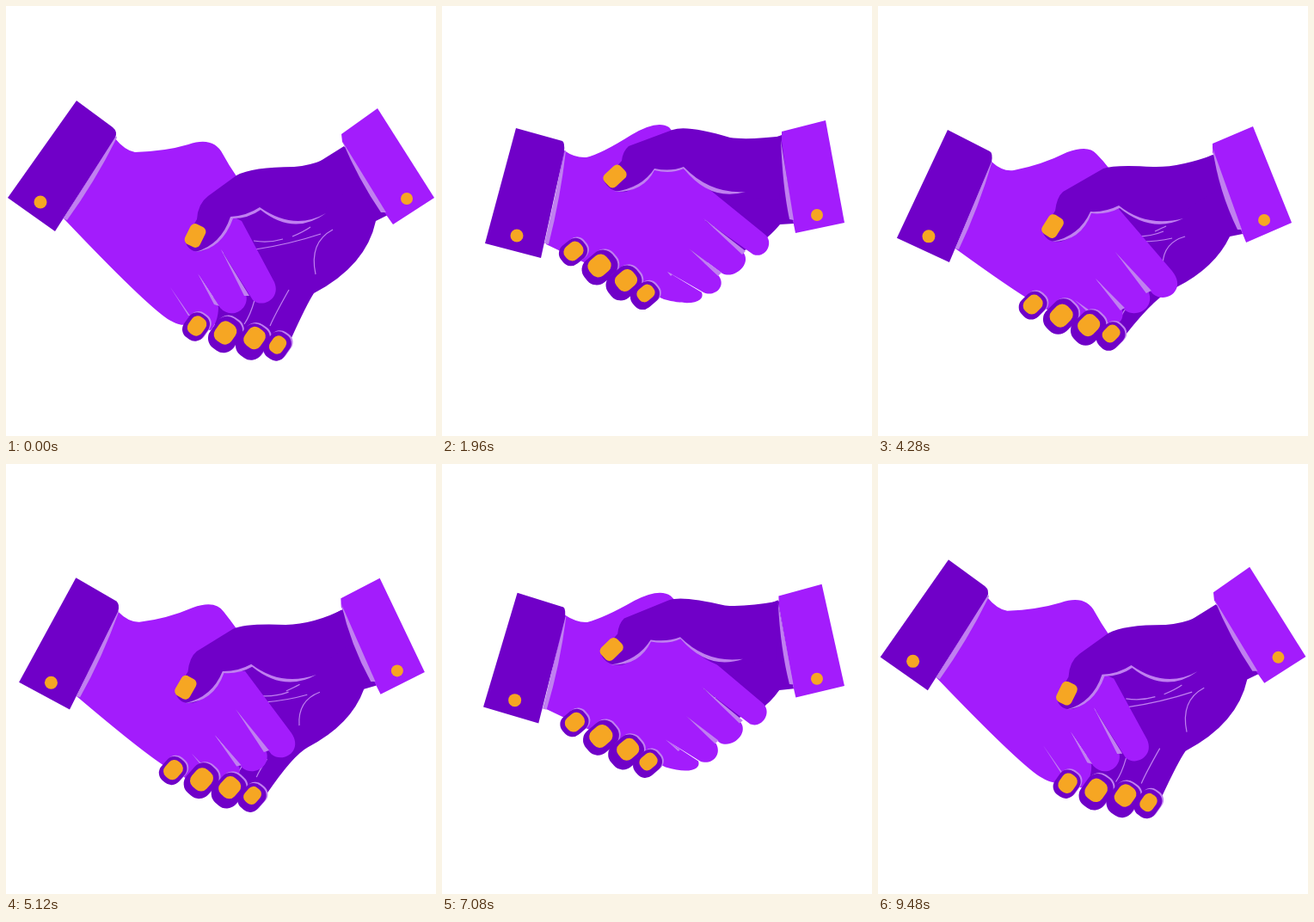
These frames come from a looping animation (500x500 px, 9.6 s). An HTML page with a canvas:

```html
<!DOCTYPE html>
<html lang="en">
<head>
<meta charset="utf-8">
<title>Handshake</title>
<style>
html, body { margin: 0; width: 100%; height: 100%; overflow: hidden; background: #fff; }
canvas { display: block; }
</style>
</head>
<body>
<canvas id="stage" width="500" height="500"></canvas>
<script>
const ctx = document.getElementById('stage').getContext('2d');
const DARK = '#7000c8', LIGHT = '#a31cfc', ORANGE = '#f6a623', SHADE = '#c080f0';
const CYCLE = 4800;

// Every part is given in four poses: reach, clasp, low shake, high shake.
const palm = [
  'M393,163 L444,243 L430,250 Q419,302 358,334 Q350,346 331,388 L300,400 L244,384 L240,345 L262,245Z',
  'M389,173 L424,265 L409,268 Q392,304 347,327 Q325,335 288,382 L268,390 L262,375 L285,350 L265,230Z',
  'M384,171 L409,274 L391,277 Q380,296 364,305 Q345,300 300,340 L280,340 L275,330 L270,320 L260,230Z',
  'M395,150 L409,253 L393,254 Q383,266 372,274 Q345,290 300,300 L290,300 L285,295 L280,290 L265,200Z'];

const creases = [
  'M288,273 Q305,276 322,271 M290,283 Q330,277 366,265 M333,268 Q347,262 354,257 M380,260 Q352,275 360,312 M329,330 Q312,360 307,372 M289,342 Q284,360 277,370',
  'M300,268 Q318,268 332,262 M305,274 Q325,274 342,270 M322,262 Q330,258 335,256 M357,268 Q332,275 331,300 M290,350 Q285,355 283,360 M272,345 Q268,350 264,356',
  'M300,265 Q322,260 330,254 M310,278 Q330,276 341,269 M300,250 Q305,250 310,255 M330,290 Q320,285 318,295 M270,340 Q268,345 266,350 M255,340 Q252,342 250,346',
  'M290,240 Q300,238 310,236 M300,250 Q310,250 320,245 M290,230 Q295,230 300,235 M320,250 Q315,255 316,265 M260,315 Q258,318 256,322 M240,318 Q238,320 236,322'];

const lightHand = [
  'M126,153 Q138,168 150,170 Q185,169 212,161 Q241,151 252,172 Q259,185 268,198 L262,244 L274,250 L312,321 C320,340 299,352 287,342 L250,283 L279,335 C284,352 263,366 249,351 L223,311 L247,350 C247,362 243,372 238,377 L220,374 L212,366 C210,374 200,371 188,364 Q160,345 67,247Z',
  'M132,181 Q145,193 158,191 Q190,185 220,170 Q245,161 254,172 Q262,180 268,188 L247,240 L280,236 L342,308 C360,330 335,347 320,335 L276,286 L315,333 C322,352 300,363 288,354 L253,317 L284,353 C288,372 272,372 262,366 L258,364 L255,366 C250,372 220,370 195,352 Q170,340 90,282Z',
  'M139,191 Q153,200 165,200 Q190,193 225,176 Q252,166 264,176 Q268,178 270,182 L245,225 L277,223 L363,300 C377,312 362,332 348,327 L294,281 L336,323 C348,335 330,355 314,348 L275,314 L309,346 C314,363 300,373 289,368 L252,342 L287,368 C290,377 275,381 258,374 Q200,340 109,297Z',
  'M142,168 Q155,177 168,176 Q185,172 220,150 Q250,132 264,141 Q268,145 270,150 L247,190 L281,189 L376,266 C386,275 377,294 362,289 L304,248 L350,286 C361,300 340,318 326,311 L287,282 L322,314 C331,327 316,339 304,333 L262,309 L302,333 C306,343 292,350 258,341 Q200,315 121,277Z'];

const gaps = [
  'M250,283 L283,337 L277,337Z M223,311 L248,349 L242,347Z M191,327 L214,360 L212,360Z',
  'M276,286 L318,331 L312,334Z M253,317 L287,351 L282,354Z M229,342 L245,353 L243,355Z',
  'M294,281 L340,322 L336,324Z M275,314 L311,343 L307,346Z M252,342 L285,367 L283,368Z',
  'M304,247 L353,285 L349,289Z M287,282 L325,310 L321,314Z M262,309 L268,312 L266,314Z'];

const thumb = [
  'M398,160 Q372,184 335,187 Q286,187 268,197 L235,221 Q223,230 222,248 L208,272 Q212,288 228,285 Q251,276 262,246 Q280,247 295,236 Q320,254 350,254 L415,200Z',
  'M393,172 Q350,188 320,187 Q275,184 262,189 L215,216 Q208,222 206,238 L191,262 Q196,276 212,274 Q236,268 247,240 Q265,242 280,234 Q305,255 330,256 L400,210Z',
  'M388,170 Q350,181 325,180 Q275,173 263,178 L209,203 Q203,210 202,222 L184,245 Q190,262 210,258 Q230,250 241,227 Q262,228 276,222 Q300,245 322,253 L390,230Z',
  'M399,151 Q355,156 335,153 Q285,138 268,144 L217,163 Q210,169 209,180 L188,203 Q196,218 214,216 Q236,208 247,190 Q266,195 281,188 Q305,215 330,222 L392,225Z'];

const thumbShade = [
  'M220,286 Q250,278 261,245 Q280,244 295,234 Q335,262 372,241 Q335,268 296,237 Q282,247 264,247 Q251,283 220,286Z',
  'M202,274 Q234,268 247,239 Q264,240 280,232 Q312,258 355,247 Q318,265 281,235 Q265,243 248,241 Q236,274 202,274Z',
  'M195,258 Q226,252 241,226 Q262,227 276,221 Q306,250 350,241 Q312,258 277,223 Q262,230 242,228 Q228,260 195,258Z',
  'M200,216 Q232,212 247,189 Q266,193 281,187 Q312,219 353,216 Q312,228 281,189 Q266,196 247,191 Q234,217 200,216Z'];

const leftCuff = [
  'M82,110 L124,141 Q130,146 127,153 L57,262 L2,223Z',
  'M81,144 L130,169 Q134,171 132,182 L83,298 L22,270Z',
  'M85,160 L138,180 Q141,182 139,195 L103,313 L40,291Z',
  'M86,142 L140,157 Q143,159 142,170 L115,293 L50,276Z'];

const leftShade = [
  'M128,151 L67,247 L71,249 Q103,205 129,153Z', 'M132,181 L90,282 L94,283 Q117,235 133,180Z',
  'M139,193 L109,296 L113,298 Q131,250 140,190Z', 'M143,168 L119,276 L124,277 Q138,222 144,168Z'];

const rightCuff = [
  'M432,119 L498,223 L450,254 L440,240 L391,158 L390,149Z',
  'M436,140 L481,252 L428,275 L422,260 L389,170 L389,160Z',
  'M433,152 L466,269 L410,285 L406,270 L385,178 L384,167Z',
  'M446,133 L468,252 L411,264 L408,249 L395,157 L395,146Z'];

const rightShade = [
  'M391,157 Q410,202 436,240 L442,240Z', 'M389,165 Q396,215 418,260 L423,260Z',
  'M384,172 Q388,225 402,270 L406,270Z', 'M394,156 Q396,210 404,248 L409,249Z'];

// x, y pairs
const leftButton = ['40,228', '59,268', '76,285', '87,267'];
const rightButton = ['466,224', '449,249', '434,262', '436,243'];
const thumbNail = ['220,267', '203,256', '196.5,240', '201,198'];
const tips = [
  '221,373 255,382 287,390.5 315.5,395.5', '180,348 212.5,361 244.5,374 270.5,384',
  '155.5,329.5 186.5,345.5 217.5,360.5 243,372', '152.5,286 183.5,304 211.5,322 236,336.5'];
const nails = [
  '222,372 255,380 289,386 316,394', '180,347 213,360 245,371 271,381',
  '156,329 187,344 219,357 244,370', '153,285 183,302 214,319 237,334'];
const tilt = ['55', '45', '42', '40'];
const thumbTilt = ['64', '58', '46', '43'];

// Half length, half width, corner radius
const tipSize = [[16.5, 13.5, 11.5], [21, 16.5, 14], [21, 16.5, 14], [17, 13.5, 11.5]];
const nailSize = [[11.5, 9.5, 8], [13, 11.5, 9], [12.5, 11, 8.5], [10.5, 8.5, 7]];

// Time in the cycle with the position along the poses, and with the tightness of the grip
const poseKeys = [[0, 0], [160, 0], [680, 3], [1300, 2], [1960, 3], [2700, 2],
                  [3180, 2.62], [3680, 2], [3800, 2], [4760, 0], [CYCLE, 0]];
const gripKeys = [[0, 0], [1960, 0], [2600, 1], [3600, 1], [4280, 0], [CYCLE, 0]];

let pose = 0, grip = 0;

function valueAt(keys, time) {
  const i = keys.findIndex(key => key[0] > time);
  const [t0, v0] = keys[i - 1], [t1, v1] = keys[i];
  const ease = (1 - Math.cos(Math.PI * (time - t0) / (t1 - t0))) / 2;
  return v0 + (v1 - v0) * ease;
}

function blend(part) {
  const i = Math.min(Math.floor(pose), part.length - 2), k = pose - i;
  const next = part[i + 1].match(/[\d.]+/g);
  let n = 0;
  return part[i].replace(/[\d.]+/g, a => (+a + (next[n++] - a) * k).toFixed(2));
}

const points = part => blend(part).split(' ').map(p => p.split(',').map(Number));

function fill(part, color) {
  ctx.fillStyle = color;
  ctx.fill(new Path2D(blend(part)));
}

function pad([x, y], [a, b, r], degrees, color) {
  ctx.save();
  ctx.translate(x, y);
  ctx.rotate(-degrees * Math.PI / 180);
  ctx.fillStyle = color;
  ctx.beginPath();
  ctx.roundRect(-a, -b, 2 * a, 2 * b, r);
  ctx.fill();
  ctx.restore();
}

// Draws a group moved by the given offset as the grip tightens
function gripped(dx, dy, drawGroup) {
  ctx.save();
  ctx.translate(dx * grip, dy * grip);
  drawGroup();
  ctx.restore();
}

function drawPalm() {
  fill(palm, DARK);
  ctx.strokeStyle = SHADE;
  ctx.lineWidth = 1.2;
  ctx.stroke(new Path2D(blend(creases)));
}

function drawLightHand() {
  fill(lightHand, LIGHT);
  fill(gaps, SHADE);
}

function drawThumb() {
  fill(thumb, DARK);
  fill(thumbShade, SHADE);
  pad(points(thumbNail)[0], [13, 9.7, 6], +blend(thumbTilt), ORANGE);
}

function drawFingers() {
  const angle = +blend(tilt), nailAt = points(nails);
  points(tips).forEach(([x, y], i) => {
    pad([x + 1.8, y - 1.2], tipSize[i], angle, SHADE);
    pad([x, y], tipSize[i], angle, DARK);
    pad(nailAt[i], nailSize[i], angle, ORANGE);
  });
}

function drawCuff(cuff, color, shade, button, radius) {
  fill(cuff, color);
  fill(shade, SHADE);
  pad(points(button)[0], [radius, radius, radius], 0, ORANGE);
}

function draw(now) {
  const time = now % CYCLE;
  pose = valueAt(poseKeys, time);
  grip = valueAt(gripKeys, time);
  ctx.fillStyle = '#fff';
  ctx.fillRect(0, 0, 500, 500);

  drawPalm();
  gripped(4, -3, drawLightHand);
  gripped(-4, 1.5, drawThumb);
  gripped(0.5, -4.5, drawFingers);
  gripped(4, 1, () => drawCuff(leftCuff, DARK, leftShade, leftButton, 7.5));
  gripped(1.5, -1.5, () => drawCuff(rightCuff, LIGHT, rightShade, rightButton, 7));
  requestAnimationFrame(draw);
}

requestAnimationFrame(draw);
</script>
</body>
</html>
```
